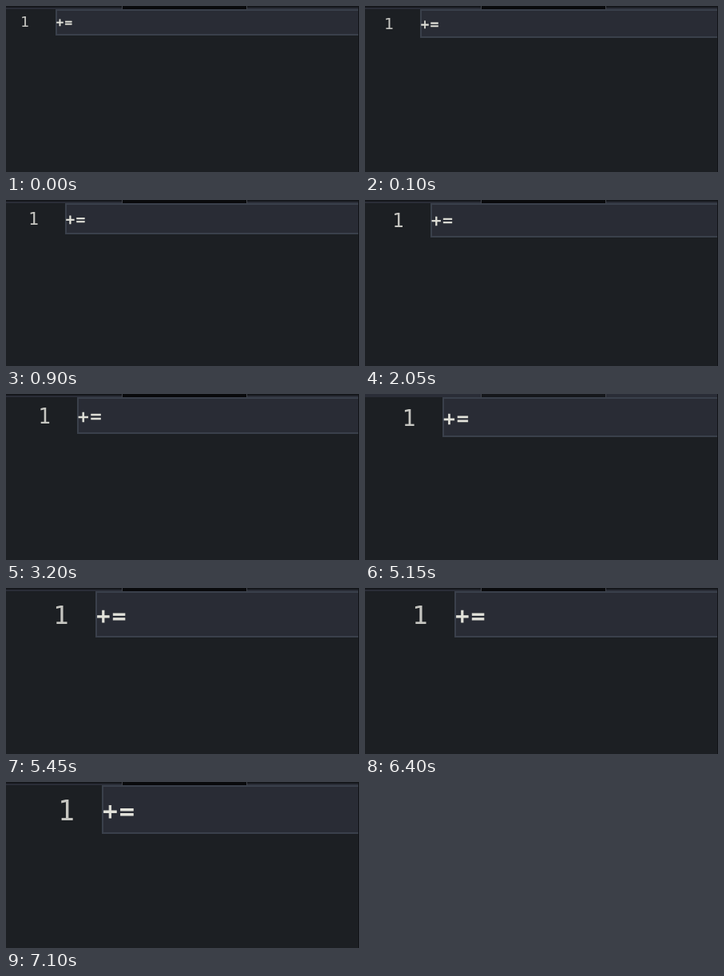
An HTML page with a canvas for the animation above (8 s loop, 442x208 px).

```html
<!DOCTYPE html>
<html lang="en">
<head>
<meta charset="utf-8">
<style>
  html, body { margin: 0; width: 100%; height: 100%; overflow: hidden; background: #1c1f23; }
  canvas { display: block; }
</style>
</head>
<body>
<canvas id="stage" width="442" height="208"></canvas>
<script>
const ctx = document.getElementById('stage').getContext('2d');
const LOOP = 8000;

// [start time in ms, zoom level of the editor font]
const ZOOM = [[0, -1.6], [50, -0.7], [900, 0], [2050, 1], [3200, 2],
              [4300, 3], [5200, 4], [5450, 5], [7100, 6]];

function rect(color, x, y, w, h) {
  ctx.fillStyle = color;
  ctx.fillRect(x, y, w, h);
}

function glyph(char, color, size, x, y) {
  ctx.font = `${size}px "DejaVu Sans Mono", monospace`;
  ctx.fillStyle = ctx.strokeStyle = color;
  ctx.fillText(char, x, y);
}

function drawTabs(bright) {
  rect(bright ? '#2a2d37' : '#15171b', 0, 0, 442, 2);
  rect('#2a2d37', 0, 2, 442, 2);
  rect(bright ? '#15171b' : '#090a0c', 146, 0, 155, 4);
  rect('#41444b', 145, 0, 1, 4);
  rect('#41444b', 301, 0, 1, 4);
}

function drawLine(zoom) {
  const advance = 13 + 1.33 * zoom;
  const size = advance / 0.6;
  const left = Math.round(74 + 7.6 * zoom);
  const bottom = Math.round(43 + 3.7 * zoom);
  const baseline = 31 + 2.85 * zoom;

  rect('#3a404b', left, 4, 441 - left, bottom - 4);
  rect('#292c35', left + 2, 6, 439 - left, bottom - 8);

  glyph('1', '#c6c6c1', size, 34.5 + 6.85 * zoom, baseline);

  const signSize = size * 0.87;
  ctx.lineWidth = size * 0.025;
  [...'+='].forEach((sign, i) => {
    const x = left + (i + 0.5) * advance;
    const y = baseline - size * 0.02;
    glyph(sign, '#e2e2da', signSize, x, y);
    ctx.strokeText(sign, x, y);
  });
}

function draw(now) {
  const t = now % LOOP;
  const zoom = ZOOM.findLast(([start]) => t >= start)[1];
  ctx.textAlign = 'center';
  rect('#1c1f23', 0, 0, 442, 208);
  drawTabs(t >= 5150 && t < 5200);
  drawLine(zoom);
  rect('#111317', 441, 0, 1, 208);
  requestAnimationFrame(draw);
}
requestAnimationFrame(draw);
</script>
</body>
</html>
```
